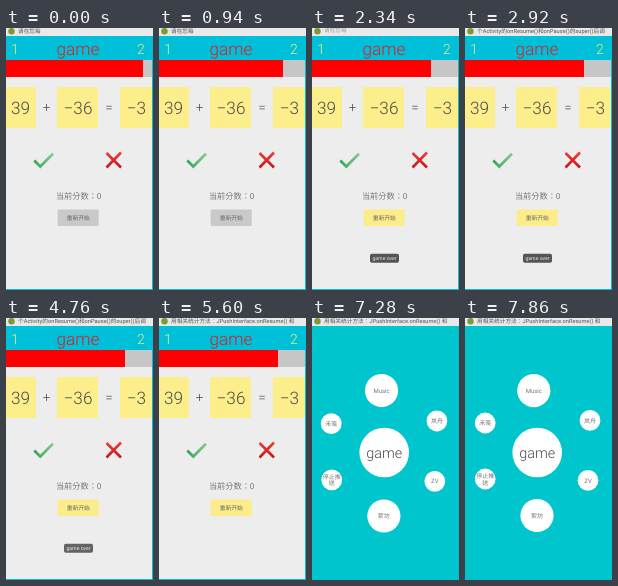
These frames come from a looping animation (147x262 px, 8 s). An HTML page:

```html
<!DOCTYPE html>
<html>
<head>
<meta charset="utf-8">
<style>
html, body { margin: 0; width: 100%; height: 100%; overflow: hidden; background: #ededed; }
svg { display: block; width: 100vw; height: 100vh; }
text { font-family: Roboto, "Noto Sans CJK TC", "Noto Sans CJK", sans-serif; text-rendering: geometricPrecision; fill: #777; }
.mid { text-anchor: middle; }
.thin { font-weight: 300; }
.dark { fill: #4a4a4a; }
.level { fill: #eaf080; font-size: 14px; }
</style>
</head>
<body>
<svg viewBox="0 0 147 262" preserveAspectRatio="none">
  <defs>
    <linearGradient id="green" x1="0" x2="1">
      <stop offset="0" stop-color="#35a554"/><stop offset="1" stop-color="#86cb8c"/>
    </linearGradient>
    <linearGradient id="red" x1="0" y1="0" x2="0" y2="1">
      <stop offset="0" stop-color="#ee3b38"/><stop offset="1" stop-color="#c4181e"/>
    </linearGradient>
  </defs>
  <rect width="147" height="262" fill="#00bfd8"/>

  <g id="play">
    <text class="mid thin level" x="9" y="26">1</text>
    <text class="mid" x="72" y="27" font-size="17.2" style="fill:#e01c22;font-weight:300">game</text>
    <text class="mid thin level" x="135" y="26">2</text>
    <rect y="32" width="146" height="229" fill="#ededed"/>
    <rect y="32" width="146" height="17" fill="#c6c6c6"/>
    <rect id="bar" y="32" height="17" fill="#f00"/>
    <g id="sum"></g>
    <path d="M28.3 132.5L34.3 138.5L47 125.8" fill="none" stroke="url(#green)" stroke-width="2.7"/>
    <path d="M100.5 125L115 139.5M115 124.5L100.5 139.5" fill="none" stroke="url(#red)" stroke-width="2.6"/>
    <text class="mid" x="72.7" y="171" font-size="8.2">当前分数：0</text>
    <rect id="button" x="51.7" y="181.5" width="41" height="16.5" rx="1"/>
    <text class="mid" x="72.3" y="192" font-size="5.8" style="fill:#666">重新开始</text>
    <g id="toast">
      <rect x="58" y="225.7" width="29" height="9" rx="1.8" fill="#555"/>
      <text class="mid" x="72.5" y="232" font-size="5.2" style="fill:#e6e6e6">game over</text>
    </g>
  </g>

  <g id="menu">
    <rect y="8" width="146" height="253" fill="#00c5cd"/>
  </g>

  <rect width="147" height="8" fill="#e9e9e9"/>
  <circle cx="5.5" cy="3.3" r="3.2" fill="#7a9a35"/>
  <text id="note" x="12" font-size="5.7" style="fill:#555"></text>
</svg>
<script>
const LOOP = 8000;
const $ = id => document.getElementById(id);

function add(parent, tag, attrs, content = "") {
  const el = document.createElementNS("http://www.w3.org/2000/svg", tag);
  for (const key in attrs) el.setAttribute(key, attrs[key]);
  el.textContent = content;
  parent.append(el);
  return el;
}

// Number cards: left, width, centre of the label, label
[[0, 30, 14.5, "39"], [51, 41, 72, "−36"], [114, 32, 130.5, "−3"]].forEach(([x, width, cx, label]) => {
  add($("sum"), "rect", { x, y: 59, width, height: 41, fill: "#fdee8c" });
  add($("sum"), "text", { class: "mid thin dark", x: cx, y: 86, "font-size": 17.2 }, label);
});
[[40.5, "+"], [103, "="]].forEach(([x, label]) =>
  add($("sum"), "text", { class: "mid thin dark", x, y: 84.3, "font-size": 13.5 }, label));

// Bubbles: start x, y, end x, y, radius, font size, lines
const bubbles = [
  [72.2, 134.5, 72.2, 134.5, 24.8, 14.4, ["game"]],
  [71, 72.4, 68.8, 72.6, 16.6, 6, ["Music"]],
  [17.3, 107, 20.2, 105, 10.4, 6, ["禾笺"]],
  [124.8, 104.1, 125, 102.4, 10.4, 6, ["岚舟"]],
  [18.8, 163.5, 20.2, 161, 10.4, 6, ["停止推", "送"]],
  [122.4, 165.1, 123, 162.4, 10.4, 6, ["ZV"]],
  [71.6, 199, 72, 197.5, 16.6, 6, ["絮坊"]]
].map(([x0, y0, x1, y1, r, size, lines]) => {
  const g = add($("menu"), "g", {});
  add(g, "circle", { r, fill: "#fff" });
  lines.forEach((line, i) => add(g, "text", {
    class: r > 20 ? "mid thin dark" : "mid",
    y: size * .36 + (i - (lines.length - 1) / 2) * 6.8,
    "font-size": size
  }, line));
  return { g, x0, y0, x1, y1 };
});

const notes = [
  "请在您每",
  "个Activity的onResume()和onPause()的super()后调",
  "用相关统计方法：JPushInterface.onResume() 和"
];

// Stepped tracks: [start time, value]
const tracks = {
  bar: [[0, 137], [370, 132], [940, 124], [1220, 119]],
  toast: [[0, 0], [1220, .38], [1780, 1], [4760, .9], [5190, 0]],
  note: [[0, 0], [2920, 1], [5600, 2]],
  leaving: [[0, 0], [2340, 1], [2920, 0], [5190, 1], [5600, 0]],
  drift: [[0, 0], [6590, .25], [7280, .66], [7860, 1]]
};

function at(name, t) {
  return tracks[name].filter(step => step[0] <= t).pop()[1];
}

function draw(t) {
  const inMenu = t >= 6160;
  $("play").style.display = inMenu ? "none" : "";
  $("menu").style.display = inMenu ? "" : "none";
  $("bar").setAttribute("width", at("bar", t));
  $("button").setAttribute("fill", t < 1220 ? "#c9c9c9" : "#fdec8a");
  $("toast").setAttribute("opacity", at("toast", t));

  const leaving = at("leaving", t);
  $("note").textContent = notes[at("note", t)];
  $("note").setAttribute("y", 5.4 - leaving);
  $("note").setAttribute("opacity", 1 - leaving * .5);

  const k = at("drift", t);
  for (const { g, x0, y0, x1, y1 } of bubbles)
    g.setAttribute("transform", `translate(${x0 + (x1 - x0) * k} ${y0 + (y1 - y0) * k})`);
}

const start = performance.now();
function tick() {
  draw((performance.now() - start) % LOOP);
  requestAnimationFrame(tick);
}
tick();
</script>
</body>
</html>
```
